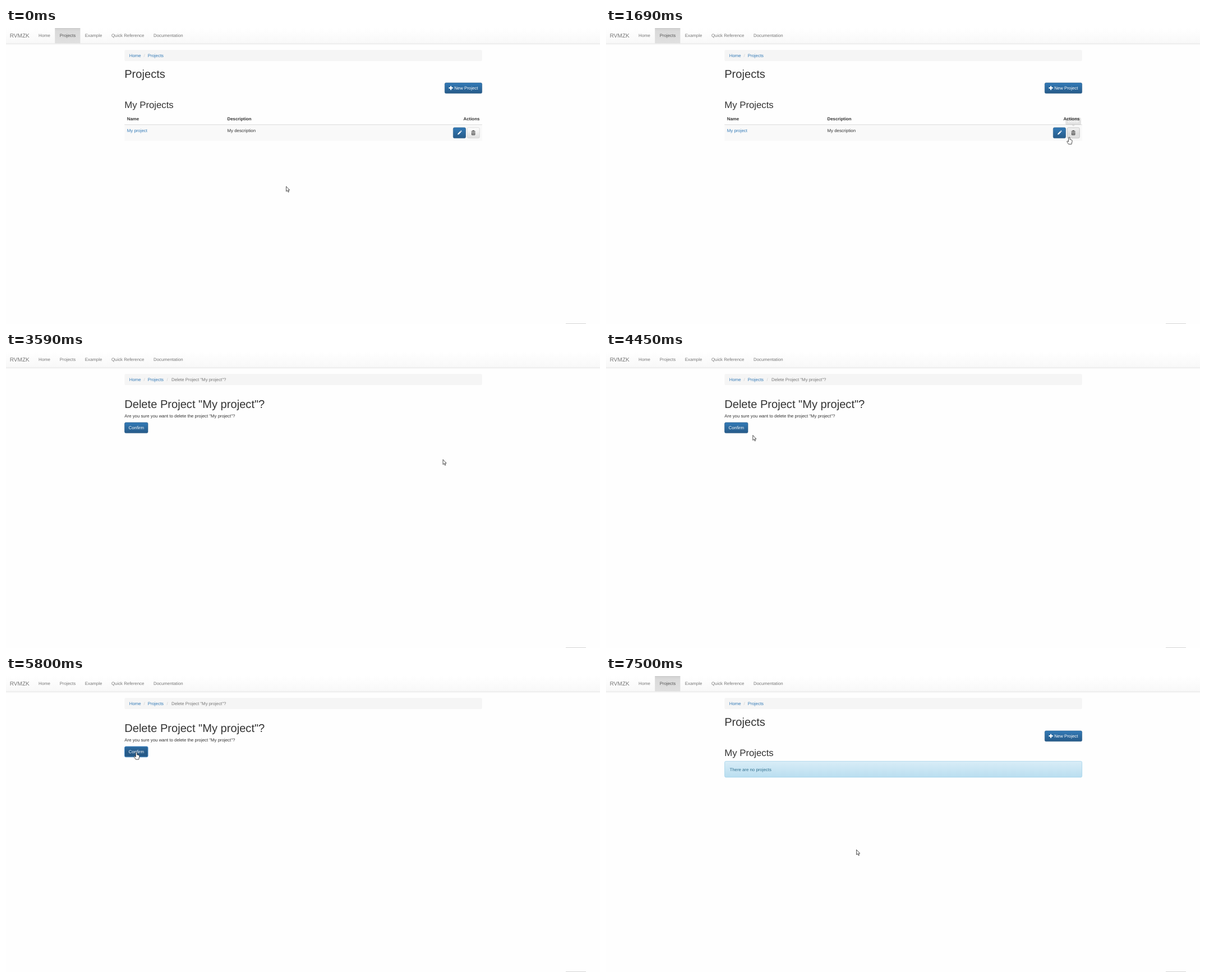
An HTML page that plays this animation: 1059x529 px, repeating every 7.96 s.

```html
<!DOCTYPE html>
<html lang="en">
<head>
<meta charset="utf-8">
<title>Delete a project</title>
<style>
  html, body { margin: 0; width: 100%; height: 100%; overflow: hidden; background: #fefefe; }
  svg { display: block; }
  text { font: 7.83px "Liberation Sans", Arial, sans-serif; fill: #333; text-rendering: geometricPrecision; white-space: pre; }
  .nav text, text.muted { fill: #777; }
  text.brand { font-size: 10.06px; }
  text.link { fill: #337ab7; }
  text.slash { fill: #ccc; }
  text.h1 { font-size: 20.12px; }
  text.h2 { font-size: 16.77px; }
  text.bold { font-weight: bold; }
  text.white { fill: #fff; }
  text.info { fill: #31708f; }
  text.tip { font-size: 6.7px; fill: #fff; text-anchor: middle; }
  .primary { fill: url(#primary); stroke: #245580; stroke-width: .6; }
  .primary.hover { fill: url(#primaryHover); }
  .primary.focus { stroke: #4a8cc7; stroke-width: 1; }
  .primary.pressed { fill: #204d74; }
  .default { fill: url(#default); stroke: #ccc; stroke-width: .6; }
  .default.hover { fill: url(#defaultHover); stroke: #adadad; }
  .default.pressed { fill: #d4d4d4; stroke: #8c8c8c; }
  .pointer { fill: #fff; stroke: #222; stroke-width: .8; stroke-linejoin: round; }
</style>
</head>
<body>
<svg width="1059" height="529">
  <defs>
    <linearGradient id="bar" x2="0" y2="1"><stop stop-color="#fff"/><stop offset="1" stop-color="#f8f8f8"/></linearGradient>
    <linearGradient id="barShadow" x2="0" y2="1"><stop stop-color="#000" stop-opacity=".05"/><stop offset="1" stop-color="#000" stop-opacity="0"/></linearGradient>
    <linearGradient id="tab" x2="0" y2="1"><stop stop-color="#cfcfcf"/><stop offset=".2" stop-color="#dadada"/><stop offset="1" stop-color="#e0e0e0"/></linearGradient>
    <linearGradient id="primary" x2="0" y2="1"><stop stop-color="#337ab7"/><stop offset="1" stop-color="#265a88"/></linearGradient>
    <linearGradient id="primaryHover" x2="0" y2="1"><stop stop-color="#2d6ca2"/><stop offset=".56" stop-color="#265a88"/></linearGradient>
    <linearGradient id="default" x2="0" y2="1"><stop stop-color="#fff"/><stop offset="1" stop-color="#e0e0e0"/></linearGradient>
    <linearGradient id="defaultHover" x2="0" y2="1"><stop stop-color="#f1f1f1"/><stop offset=".56" stop-color="#e0e0e0"/></linearGradient>
    <linearGradient id="info" x2="0" y2="1"><stop stop-color="#d9edf7"/><stop offset="1" stop-color="#b9def0"/></linearGradient>
  </defs>

  <g class="nav">
    <rect width="1059" height="28" fill="url(#bar)"/>
    <rect y="28" width="1059" height="3" fill="url(#barShadow)"/>
    <rect y="27.5" width="1059" height=".7" fill="#e4e4e4"/>
    <rect id="activeTab" x="87.2" width="45.2" height="27.5" fill="url(#tab)"/>
    <text class="brand" x="6.8" y="17">RVMZK</text>
    <text x="58" y="16.3">Home</text>
    <text id="tabLabel" x="95.8" y="16.3">Projects</text>
    <text x="140.8" y="16.3">Example</text>
    <text x="188" y="16.3">Quick Reference</text>
    <text x="263" y="16.3">Documentation</text>
  </g>

  <rect x="211.3" y="39.2" width="637.5" height="20" rx="2.2" fill="#f5f5f5"/>
  <text class="link" x="219.8" y="52">Home</text>
  <text class="slash" x="245.6" y="52">/</text>
  <text class="link" x="252.7" y="52">Projects</text>

  <g id="listPage">
    <text class="h1" x="211.2" y="88.5">Projects</text>
    <rect class="primary" x="782.3" y="98" width="66.3" height="18.8" rx="2.2"/>
    <path d="M792 103.7h2.2v2.4h2.5v2.2h-2.5v2.5h-2.2v-2.5h-2.5v-2.2h2.5z" fill="#fff"/>
    <text class="white" x="799.2" y="110.2">New Project</text>
    <text class="h2" x="211.2" y="143.2">My Projects</text>

    <g id="table">
      <text class="bold" x="215.8" y="165">Name</text>
      <text class="bold" x="394.6" y="165">Description</text>
      <text class="bold" x="844.3" y="165" text-anchor="end">Actions</text>
      <rect x="211.3" y="173" width="637.5" height="28.6" fill="#f9f9f9"/>
      <rect x="211.3" y="172.2" width="637.5" height="1.1" fill="#ddd"/>
      <text class="link" x="215.8" y="186.2">My project</text>
      <text x="394.6" y="186.2">My description</text>
      <rect class="primary" x="797.3" y="178" width="22.2" height="18.8" rx="2.2"/>
      <path d="M805 190.8l.7-2.4 4-4 1.7 1.7-4 4zM810.2 183.9l.6-.6q.4-.3.8 0l.9.9q.3.4 0 .8l-.6.6z" fill="#fff"/>
      <rect id="trashButton" class="default" x="822.3" y="178" width="22" height="18.8" rx="2.2"/>
      <path d="M829.6 184.8h7.2M831.9 184.4v-1h2.6v1M830.5 186.2v4.8h5.4v-4.8M832.3 186v4.6M834.1 186v4.6" fill="none" stroke="#333" stroke-width=".9"/>
      <g id="tooltip">
        <path d="M830.4 173h5.6l-2.8 2.8z"/>
        <rect x="819.2" y="160.2" width="27.8" height="12.9" rx="2.2"/>
        <text class="tip" x="833.1" y="169">Delete</text>
      </g>
    </g>

    <g id="emptyNotice">
      <rect x="211.6" y="152.4" width="637" height="28.6" rx="2.2" fill="url(#info)" stroke="#9acfea" stroke-width=".7"/>
      <text class="info" x="220.4" y="169.5">There are no projects</text>
    </g>
  </g>

  <g id="confirmPage">
    <text class="slash" x="286.5" y="52">/</text>
    <text class="muted" x="295" y="52">Delete Project "My project"?</text>
    <text class="h1" x="211.2" y="99.6">Delete Project "My project"?</text>
    <text x="211.3" y="117.4">Are you sure you want to delete the project "My project"?</text>
    <rect id="confirmButton" class="primary" x="211.5" y="126" width="41.5" height="18.8" rx="2.2"/>
    <text class="white" x="218.6" y="138.2">Confirm</text>
  </g>

  <rect x="998" y="528" width="36" height="1" fill="#d4d4d4"/>

  <g id="pointer">
    <path id="arrow" class="pointer" d="M.3.3V9.2L2.3 7.4 3.8 10.6 5.2 10 3.8 6.9H6.4z"/>
    <path id="hand" class="pointer" d="M-1.2 1Q0-.6 1.2 1V4.4L4.3 5.2Q5.5 5.7 5.3 7.6L4.2 12.8H-1.2L-4 8.4Q-4 6.9-2.6 7.3L-1.2 8.5z"/>
    <path id="beam" d="M-2.5-5H-.6L0-4.4.6-5H2.5M0-4.4V4.4M-2.5 5H-.6L0 4.4.6 5H2.5" fill="none" stroke="#222" stroke-width=".9"/>
  </g>
</svg>

<script>
const LOOP = 7960;
const CONFIRM_AT = 3160, DELETED_AT = 5950;

const linear = u => u;
const easeOut = u => 1 - (1 - u) ** 1.7;
const easeInOut = u => u * u * (3 - 2 * u);

// Pointer moves: first step, last step, number of steps, destination, easing
const START = [499.3, 282.8];
const MOVES = [
  [610, 1390, 11, 794, 202, easeInOut],
  [1460, 1690, 4, 825.8, 194.8, linear],
  [1780, 2020, 4, 835, 188.5, easeOut],
  [3590, 3820, 4, 610, 202, linear],
  [3900, 4140, 4, 329, 160, easeOut],
  [4300, 4450, 3, 261.5, 148.5, linear],
  [4600, 5090, 9, 232.5, 136.3, easeOut],
  [6120, 6500, 6, 280.5, 166.5, linear],
  [6670, 6670, 1, 295.3, 174, linear],
  [6740, 7440, 11, 444, 306, easeOut],
  [7500, 7500, 1, 446.3, 310.2, linear]
];

const el = Object.fromEntries([...document.querySelectorAll("svg [id]")].map(node => [node.id, node]));
const show = (node, visible) => { node.style.display = visible ? "" : "none"; };
const between = (value, low, high) => value >= low && value < high;

function pointerAt(t) {
  let [x, y] = START;
  for (const [from, to, steps, toX, toY, ease] of MOVES) {
    if (t < from) break;
    const interval = (to - from) / Math.max(1, steps - 1);
    const step = t >= to ? steps : Math.floor((t - from) / interval) + 1;
    const u = ease(step / steps);
    x += (toX - x) * u;
    y += (toY - y) * u;
  }
  return [x, y];
}

function pointerShape(t, x, y) {
  if (between(t, 1690, CONFIRM_AT)) return "hand";
  if (between(t, 4600, 6120)) return x < 253 && y < 145 ? "hand" : "arrow";
  const overText = y < 143 || (between(y, 161, 172) && x < 295);
  return between(t, 6120, 6670) && overText ? "beam" : "arrow";
}

function tooltipOpacity(t) {
  if (t < 1690) return 0;
  return t < 1780 ? .1 : t < 1860 ? .6 : .92;
}

function draw(t) {
  const confirming = between(t, CONFIRM_AT, DELETED_AT);
  const [x, y] = pointerAt(t);
  const shape = pointerShape(t, x, y);

  show(el.listPage, !confirming);
  show(el.confirmPage, confirming);
  show(el.activeTab, !confirming);
  el.tabLabel.style.fill = confirming ? "#777" : "#555";
  show(el.table, t < CONFIRM_AT);
  show(el.emptyNotice, t >= DELETED_AT);
  el.tooltip.setAttribute("opacity", tooltipOpacity(t));

  el.trashButton.classList.toggle("hover", t >= 1690);
  el.trashButton.classList.toggle("pressed", between(t, 2560, 2650));
  el.confirmButton.classList.toggle("hover", shape === "hand");
  el.confirmButton.classList.toggle("focus", t >= 5180);
  el.confirmButton.classList.toggle("pressed", between(t, 5180, 5420));

  for (const name of ["arrow", "hand", "beam"]) show(el[name], name === shape);
  el.pointer.setAttribute("transform", `translate(${x} ${y})`);
}

function frame() {
  draw(performance.now() % LOOP);
  requestAnimationFrame(frame);
}
frame();
</script>
</body>
</html>
```
